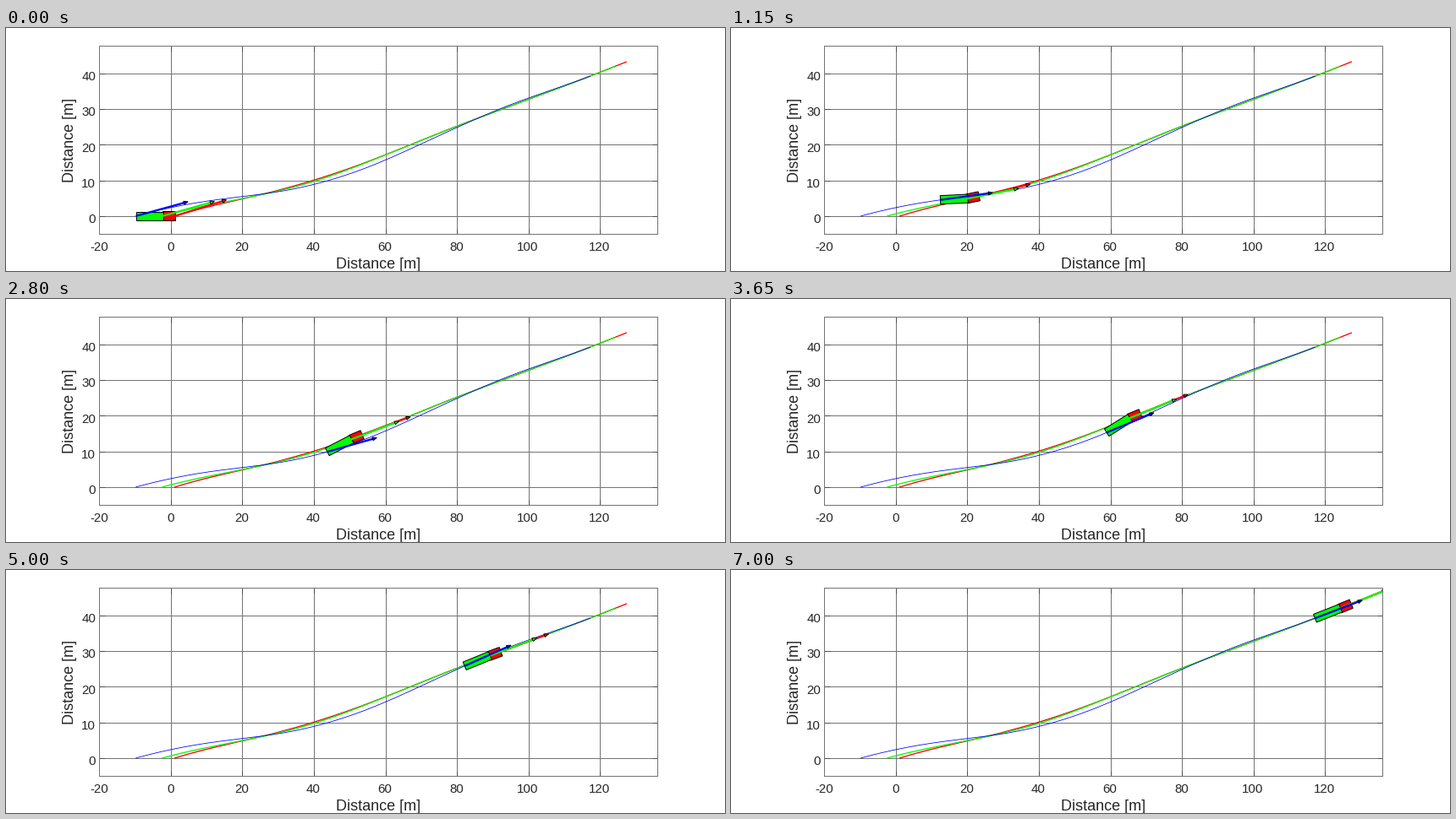
Animation of 850x288 px, one loop 7.05 s. Source, as a matplotlib script:

```python
import numpy as np
import matplotlib.pyplot as plt
from matplotlib.animation import FuncAnimation
from matplotlib.patches import Polygon

W, H = 850, 288
PX = 0.72  # points per pixel at 100 dpi
LEFT, BOTTOM, WIDTH, HEIGHT = 110.4, 44, 659.3, 223
FRAMES, STEP = 141, 50
RED, GREEN, BLUE = (1, 0, 0), (0, 1, 0), (0, 0, 1)
INK, RULE = "#262626", "#747474"

WHEELBASE = 3.5   # tractor axle to axle
HITCH = 0.3       # hitch ahead of the tractor's rear axle
TRAILER = 7.7     # hitch to trailer axle
ARROW = 15.1      # arrow length per metre travelled in one step


class Path:
    """Smooth curve through evenly spaced heights, with given end slopes."""

    def __init__(self, x0, x1, heights, s0, s1):
        self.x0, self.y = x0, np.array(heights, float)
        n = len(heights)
        self.h = (x1 - x0) / (n - 1)
        a = 4 * np.eye(n) + np.eye(n, k=1) + np.eye(n, k=-1)
        a[0], a[-1] = np.eye(n)[0], np.eye(n)[-1]
        inner = 3 * (self.y[2:] - self.y[:-2]) / self.h
        self.m = np.linalg.solve(a, np.r_[s0, inner, s1]) * self.h

    def __call__(self, x):
        u = (x - self.x0) / self.h
        i = np.clip(np.floor(u).astype(int), 0, len(self.y) - 2)
        t = u - i
        rise = self.y[i + 1] - self.y[i]
        return (self.y[i] + rise * t * t * (3 - 2 * t)
                + t * (1 - t) * (self.m[i] * (1 - t) - self.m[i + 1] * t))

    def heading(self, x, e=1e-3):
        return unit(np.array([2 * e, self(x + e) - self(x - e)]))


def unit(v):
    return v / np.hypot(*v)


front_path = Path(1.105, 127.1, [0, 6.3, 13.94, 23.93, 33.43, 43.15],
                  0.314, 0.4)
rear_path = Path(-2.395, 123.77, [0, 4.62, 9.63, 17.43, 25.87, 33.75, 41.8],
                 0.28, 0.4)
trailer_path = Path(-9.795, 116.9, [0, 4.37, 7.25, 13.13, 22.4, 31.55, 39.1],
                    0.276, 0.38)
paths = (front_path, rear_path, trailer_path)

# Arc length along the trailer's path
track = np.linspace(-9.795, 118, 2000)
arc = np.r_[0, np.cumsum(np.hypot(np.diff(track),
                                  np.diff(trailer_path(track))))]


def travelled(k):
    """Metres covered after k steps; sliding eats a little speed early on."""
    return 0.934 * k + 3.1 * (1 - np.exp(-k / 45))


def ahead(p, path, dist):
    """Point of the path at a straight distance in front of p."""
    xs = p[0] + np.linspace(0.6, 1, 200) * dist
    x = np.interp(dist, np.hypot(xs - p[0], path(xs) - p[1]), xs)
    return np.array([x, path(x)])


def pose(k):
    x = np.interp(travelled(k), arc, track)
    trailer = np.array([x, trailer_path(x)])
    rear = ahead(trailer, rear_path, TRAILER - HITCH)
    front = ahead(rear, front_path, WHEELBASE)
    return front, rear, trailer


def box(back, nose, width):
    u = unit(nose - back)
    side = np.array([-u[1], u[0]]) * width / 2
    return [back + side, nose + side, nose - side, back - side]


fig = plt.figure(figsize=(W / 100, H / 100), dpi=100, facecolor="white")
ax = fig.add_axes([LEFT / W, BOTTOM / H, WIDTH / W, HEIGHT / H])
ax.set(xlim=(-20, 136), ylim=(-5, 47.8),
       xticks=range(0, 121, 20), yticks=range(0, 41, 10))
ax.set_axisbelow(True)
ax.grid(color=RULE, lw=PX)
ax.tick_params(direction="in", length=6.5 * PX, width=PX, color="#505050",
               top=True, right=True, labelbottom=False, labelleft=False)
for spine in ax.spines.values():
    spine.set(color=RULE, linewidth=PX)


def label(x, y, text, size, **kw):
    fig.text(x / W, 1 - y / H, text, fontsize=size * PX, color=INK,
             family="Liberation Sans", va="baseline", **kw)


for v in range(-20, 121, 20):
    label(LEFT - 0.6 + (v + 20) * WIDTH / 156, 264, str(v), 15, ha="center")
for v in range(0, 41, 10):
    label(106, 231 - v * HEIGHT / 52.8, str(v), 15, ha="right")
label(440, 285, "Distance [m]", 18, ha="center")
label(80.5, 132.5, "Distance [m]", 18, ha="center", rotation=90,
      rotation_mode="anchor")

colors = (RED, GREEN, BLUE)
for path, a, b, color, lw in zip(paths, pose(0), pose(FRAMES - 1), colors,
                                 (1.3, 1.3, 0.8)):
    xs = np.linspace(a[0], b[0], 400)
    ax.plot(xs, path(xs), color=color, lw=lw * PX, zorder=3)


def shape(color, z, lw=1.0):
    return ax.add_patch(Polygon(np.zeros((3, 2)), fc=color, ec="black",
                                lw=lw * PX, joinstyle="miter", zorder=z))


tractor_box, trailer_box = shape(RED, 4), shape(GREEN, 5)
arrows = [(ax.plot([], [], color=c, lw=2.3 * PX, zorder=6 + i,
                   solid_capstyle="butt")[0], shape(c, 6.5 + i, 0.9))
          for i, c in enumerate(colors)]


def draw(k):
    points = pose(k)
    front, rear, trailer = points
    hitch = rear + HITCH * unit(front - rear)
    tractor_box.set_xy(box(rear, front, 2.6))
    trailer_box.set_xy(box(trailer, hitch, 2.4))
    reach = ARROW * (travelled(k + 0.5) - travelled(k - 0.5))
    for p, path, (shaft, head) in zip(points, paths, arrows):
        u = path.heading(p[0])
        side = np.array([-u[1], u[0]]) * 0.48
        tip = p + reach * u
        neck = tip - 1.2 * u
        shaft.set_data(*np.array([p, neck]).T)
        head.set_xy([tip, neck + side, neck - side])
    return []


anim = FuncAnimation(fig, draw, frames=FRAMES, interval=STEP, repeat=True,
                     init_func=lambda: draw(0))
plt.show()
```
